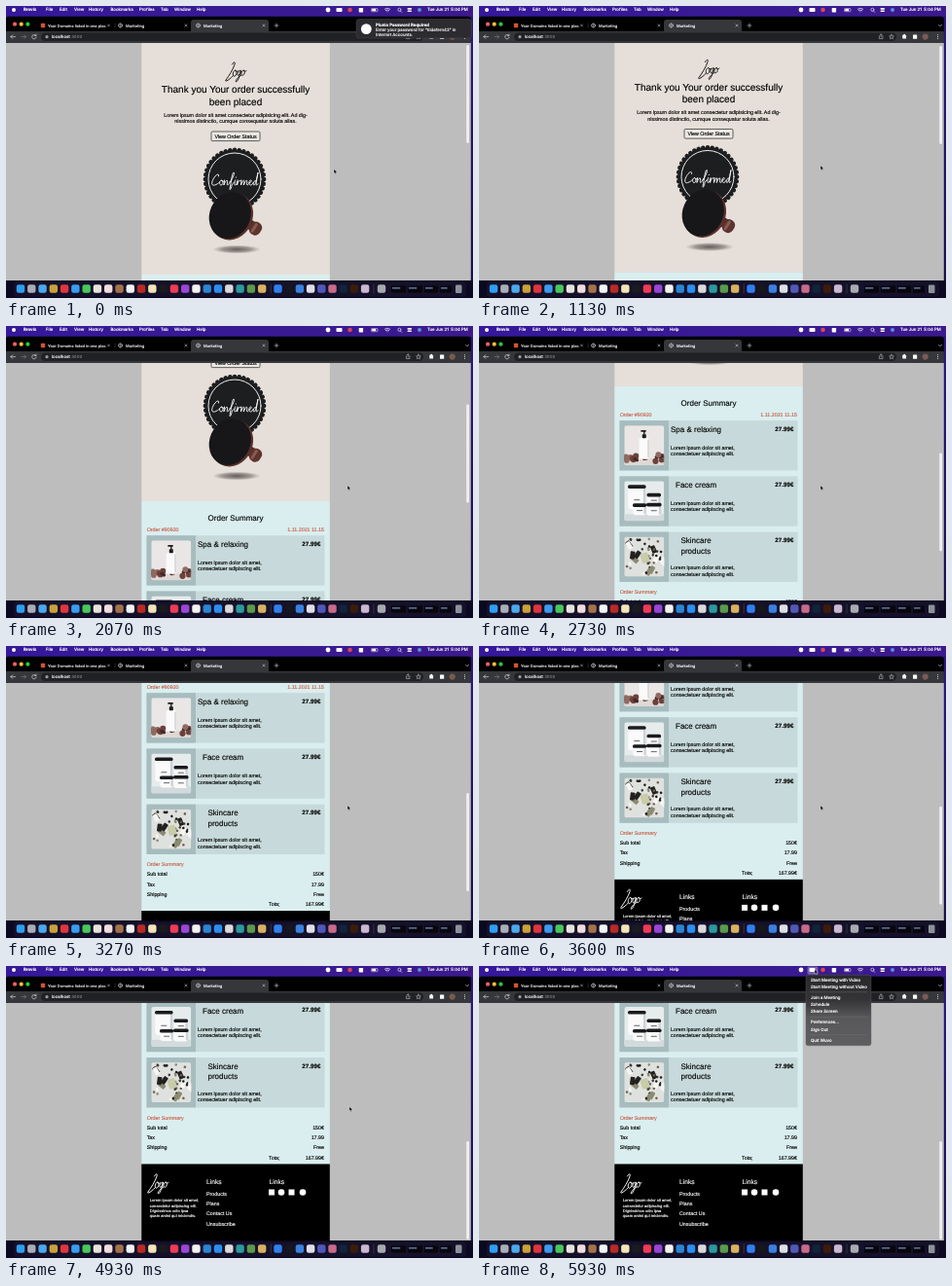
An HTML page for the animation above (5.99 s loop, 480x300 px).

```html
<!DOCTYPE html>
<html lang="en">
<head>
<meta charset="utf-8">
<title>Order confirmation</title>
<style>
html, body { margin: 0; height: 100%; overflow: hidden; background: #000; }
svg { display: block; width: 100vw; height: 100vh; }
text { text-rendering: geometricPrecision; white-space: pre; }
.ui { font-family: Inter, Roboto, sans-serif; font-weight: 500; }
.web { font-family: "Liberation Sans", Arial, sans-serif; }
.ink { fill: none; stroke-linecap: round; stroke-linejoin: round; }
</style>
</head>
<body>
<svg id="stage" viewBox="0 0 480 300" preserveAspectRatio="none"></svg>
<script>
const LOOP = 5990, STEP = 200 / 3, MAX_SCROLL = 331.5, VIEW_TOP = 38, VIEW_H = 244;

const rect = (x, y, w, h, fill, r = 0, more = '') =>
  `<rect x="${x}" y="${y}" width="${w}" height="${h}" rx="${r}" fill="${fill}" ${more}/>`;
const dot = (x, y, r, fill, more = '') => `<circle cx="${x}" cy="${y}" r="${r}" fill="${fill}" ${more}/>`;
const oval = (x, y, rx, ry, fill, more = '') =>
  `<ellipse cx="${x}" cy="${y}" rx="${rx}" ry="${ry}" fill="${fill}" ${more}/>`;
const line = (d, stroke, w, more = '') =>
  `<path class="ink" d="${d}" stroke="${stroke}" stroke-width="${w}" ${more}/>`;
// A hairline stroke gives small text the weight of screen rendering.
const text = (x, y, s, size, fill = '#000', more = '') =>
  `<text x="${x}" y="${y}" font-size="${size}" fill="${fill}" stroke="${fill}" stroke-width=".14" ${more}>${s.replace(/&/g, '&amp;')}</text>`;
const MID = 'text-anchor="middle"', END = 'text-anchor="end"', BOLD = 'font-weight="700"';
const BODY = 16 / 3, UI = 13 / 3;

function random(seed) {
  return () => (seed = (seed * 16807) % 2147483647) / 2147483647;
}

const LOGO = 'M7.5 3C9 0 11 0 10 3C8.5 8 4 15 1 19C0 21 2 20 4 18.6C6 17 7 16 8.5 14.5' +
  'M10.5 9C7.6 10 7.6 15.6 9.8 15.2C12.4 14.6 12.6 9 10.5 9C11.5 10.6 12.6 10.4 13.6 10' +
  'M16 9.3C13 8.6 12 14.4 13.8 14.4C15.2 14.2 16 11.5 16.4 9.3C15.4 14 14 19 12 20.8C10.4 21.6 11 17.6 17 14' +
  'M19 9C16.6 9.4 16.2 14.4 18.2 14.3C20.6 14 21 9 19 9C19.8 10.6 21 10.2 22 9.6';

const CONFIRMED = 'M8-9C9-12 6-12 3-7C0-2 1 1 4 0C6-.5 8-2 9-3' +
  'M11-5C8.5-5 8.5 0 10.5 0C13 0 13-5 11-5C12-3.5 13-3.5 14-4' +
  'M14-5L13.4 0C14.5-3 16-5.5 17-4.5C17.6-3.5 16 0 17.2 0C18 0 19-2 20-4' +
  'M20-3C23-8 25-13 23.5-13C22-13 21-4 19.5 4C19.5 6 21.5 3 21.5 0C22-1 23-2 24-3' +
  'M25-5C24.5-3 24 0 25 0C26 0 27-2 27.6-4M25.8-8l.2 0' +
  'M27.5-5L27 0C27.6-3 29-5.4 31-4.6' +
  'M31.5-5L31 0C32-3 33.5-5.6 34.3-4.5C34.6-3.5 33.8-1.5 33.8 0C34.8-3 36.4-5.6 37.2-4.5' +
  'C37.7-3.5 36.3 0 37.5 0C38.3 0 39-1.5 39.5-2.5' +
  'C42-3 42.5-5 41-5C39-5 38.8 0 41 0C42.2 0 43-1.5 43.5-2.5' +
  'M46.5-4.5C44.5-5.5 42.8-1 44.2 0C45.6.2 46.5-3 48.5-13C47.5-7 46 0 47 0C47.7 0 48-.6 48.5-1.3';

const logo = (x, y, color) => line(LOGO, color, 0.95, `transform="translate(${x} ${y})"`);

function stamp() {
  return dot(235, 178, 30.5, '#1d1e20') +
    `<circle class="ink" cx="235" cy="178" r="30.2" stroke="#1d1e20" stroke-width="4.4" pathLength="40" stroke-dasharray=".01 .99"/>` +
    `<circle class="ink" cx="235" cy="178" r="27" stroke="#eee" stroke-width="1"/>` +
    line(CONFIRMED, '#fff', 0.9, 'transform="translate(210.5 184)"') +
    oval(237, 250, 25, 4.5, 'url(#shade)') +
    `<g transform="rotate(32 250 224)">` +
    rect(243, 219, 16, 10, '#4a2a26', 3) + rect(252, 217.5, 12, 14, '#5d342e', 5.5) +
    rect(255, 219, 3, 11, '#8a5a50', 1.5) + `</g>` +
    oval(232, 216, 21.5, 25, '#5a302b', 'transform="rotate(24 232 216)"') +
    oval(230.3, 215, 21, 24.6, '#17171a', 'transform="rotate(24 230.3 215)"');
}

// Product pictures, drawn in a 41 by 41 box.
function bottlePhoto() {
  const rnd = random(11);
  let s = rect(0, 0, 41, 41, '#e9e6e5') + rect(0, 34, 41, 7, '#dfd8d5');
  for (let i = 0; i < 20; i++) {
    const x = 1 + rnd() * 39;
    s += dot(x, 30 + rnd() * 7, 1.8 + rnd() * 1.8, ['#6d4039', '#8f6a61', '#43292a'][i % 3]);
  }
  return s + rect(15.3, 12.5, 10.5, 22, '#fafafa', 2) + rect(23.8, 14, 2, 19, '#dadada', 1) +
    rect(18.5, 9, 4, 4, '#1c1c1c', 0.6) + rect(19.8, 5.5, 1.4, 4, '#1c1c1c') + rect(17, 4.8, 5.5, 1.7, '#1c1c1c', 0.6);
}

function jarPhoto() {
  const jar = (x, y, w, h) => rect(x, y + 1, w, h, '#fafafa', 2.4) +
    rect(x + w - 2.4, y + 3, 2.4, h - 3, '#cdd3d6', 1.2) + rect(x - 0.3, y, w + 0.6, 3.6, '#191b1d', 1.6) +
    rect(x + w / 2 - 3, y + h * 0.62, 6, 0.9, '#555');
  return rect(0, 0, 41, 41, '#e6ebec') + rect(0, 34, 41, 7, '#d3dadc') +
    jar(4, 4, 18, 24) + jar(23.5, 12.5, 14, 11) + jar(9, 23, 13.5, 11) + jar(23, 22.5, 15, 12);
}

function flatlayPhoto() {
  const rnd = random(77);
  const tones = ['#22211f', '#3d3b35', '#8c8b72', '#1a1a1a', '#f6f5f1', '#6d5f4c'];
  let s = rect(0, 0, 41, 41, '#dfe1de');
  for (let i = 0; i < 46; i++) {
    const x = 2 + rnd() * 36, y = 2 + rnd() * 36, big = i % 4 === 0;
    s += rect(x - 1, y - 1, big ? 4.8 : 2.4, big ? 8 : 2.4, tones[i % 6], 0.8,
      `transform="rotate(${rnd() * 120 - 60} ${x} ${y})"`);
  }
  return s + rect(17, 17, 8, 10, '#c9cca8', 1, 'transform="rotate(-18 20 21)"');
}

function card(y, x, title, descY, photo) {
  return rect(144.5, y, 183, 51.3, '#c7d9da') + rect(144.5, y, 50.5, 51.3, '#a7bcbe') +
    `<g clip-path="url(#round)" transform="translate(149.3 ${y + 5})">${photo}</g>` +
    title.map((s, i) => text(x, y + 11.7 + i * 10.4, s, 8)).join('') +
    text(323.4, y + 10.4, '27.99€', 6.24, '#000', `${END} ${BOLD}`) +
    text(197, y + descY, 'Lorem ipsum dolor sit amet,', BODY) +
    text(197, y + descY + 6.5, 'consectetuer adipiscing elit.', BODY);
}

function page() {
  const red = '#c65f49', white = '#fff';
  const rows = [['Sub total', '150€'], ['Tax', '17.99'], ['Shipping', 'Free'], ['Tota;', '167.99€']];
  const about = ['Lorem ipsum dolor sit amet,', 'consectetur adipiscing elit.', 'Dignissimos odio ipsa', 'quam animi qui reiciendis.'];
  return rect(139.3, 38, 193.5, 238, '#e6dfd9') + rect(139.3, 276, 193.5, 259, '#daeeef') + rect(139.3, 535, 193.5, 110, '#000') +
    logo(225, 57, '#111') +
    text(236, 89.3, 'Thank you Your order successfully', 10, '#000', MID) +
    text(236, 102, 'been placed', 10, '#000', MID) +
    text(236, 113.5, 'Lorem ipsum dolor sit amet consectetur adipisicing elit. Ad dig-', BODY, '#000', MID) +
    text(236, 120.3, 'nissimos distinctio, cumque consequatur soluta alias.', BODY, '#000', MID) +
    rect(211, 129, 50, 9.6, '#ece8e4', 1.2, 'stroke="#222" stroke-width=".7"') +
    text(236, 135.8, 'View Order Status', BODY, '#000', MID) +
    stamp() +
    text(236, 296, 'Order Summary', 8, '#000', MID) +
    text(144.7, 307, 'Order #90920', BODY, red) +
    text(327, 307, '1.11.2021 11.15', BODY, red, END) +
    card(311.2, 197, ['Spa & relaxing'], 29.6, bottlePhoto()) +
    card(368.4, 202, ['Face cream'], 29.6, jarPhoto()) +
    card(425.6, 207.5, ['Skincare', 'products'], 38.8, flatlayPhoto()) +
    text(144.7, 489, 'Order Summary', BODY, red) +
    rows.map(([a, b], i) => text(i === 3 ? 270 : 144.7, 499.2 + i * 10.3, a, BODY) +
      text(327, 499.2 + i * 10.3, b, BODY, '#000', END)).join('') +
    logo(145, 544.5, white) +
    about.map((s, i) => text(147.8, 573.8 + i * 5.2, s, 4.1, white)).join('') +
    text(206, 555.2, 'Links', 20 / 3, white) + text(270.5, 555.2, 'Links', 20 / 3, white) +
    ['Products', 'Plans', 'Contact Us', 'Unsubscribe'].map((s, i) => text(206, 567 + i * 10.35, s, BODY, white)).join('') +
    [273, 283, 293.5, 305].map((x, i) => i % 2 ? dot(x, 564, 3.3, white) : rect(x - 3, 561, 6, 6, white)).join('');
}

function menuBar() {
  const items = [[41, 'File'], [55, 'Edit'], [70, 'View'], [85, 'History'], [107.5, 'Bookmarks'],
    [137, 'Profiles'], [159, 'Tab'], [173, 'Window'], [196, 'Help']];
  const w = '#fff';
  return dot(8, 4, 2, w) +
    text(18, 5.4, 'Brovix', UI, w, BOLD) + items.map(([x, s]) => text(x, 5.4, s, UI, w)).join('') +
    dot(331, 4, 2.4, w) +
    rect(339.5, 2, 6, 4, w, 0.8) + dot(353.5, 4, 2.3, '#d8455a') + rect(362.7, 2, 4.4, 4.4, w, 0.6) +
    rect(375.5, 2.5, 6.5, 3.2, 'none', 0.8, 'stroke="#fff" stroke-width=".5"') + rect(376.2, 3.1, 4, 2, w) +
    line('M389.2 3.2Q392 1 394.8 3.2M390.3 4.6Q392 3.3 393.7 4.6M392 5.8l0 0', w, 0.7) +
    line('M405.3 5l1.4 1.4M406 3.8a1.6 1.6 0 1 1-3.2 0a1.6 1.6 0 1 1 3.2 0', w, 0.6) +
    rect(412.5, 2, 4.5, 1.7, w, 0.8) + rect(412.5, 4.4, 4.5, 1.7, w, 0.8) + dot(425, 4, 2, '#5f8ed8') +
    text(474.8, 5.4, 'Tue Jun 21  5:04 PM', UI, w, END);
}

function browser() {
  const g = '#d6d7da', globe = x => `<circle class="ink" cx="${x}" cy="20" r="2" stroke="${g}" stroke-width=".6"/>` +
    line(`M${x - 2} 20h4M${x} 18v4`, g, 0.4);
  const cross = x => line(`M${x - 1.1} 18.9l2.2 2.2m0-2.2l-2.2 2.2`, g, 0.5);
  return rect(0, 10.8, 477.8, 20, '#000', 3) +
    ['#f35f57', '#f5bd2f', '#28c840'].map((c, i) => dot(9 + i * 6.7, 18.7, 2.1, c)).join('') +
    rect(190, 14, 80, 14, '#36373b', 3) + rect(0, 26, 477.8, 12, '#36373b') +
    rect(36, 27.5, 393, 8.4, '#202124', 4.2) +
    rect(35.8, 17.8, 4.4, 4.4, '#d4532f', 0.8) +
    `<g clip-path="url(#tab)">${text(43, 21.5, 'Your Domains listed in one place', 4, '#ddd')}</g>` +
    globe(117.5) + text(123, 21.5, 'Marketing', 4, '#ddd') + globe(197.5) + text(203, 21.5, 'Marketing', 4, '#eee') +
    cross(105.5) + cross(185) + cross(265) + line('M276 20h4M278 18v4', g, 0.6) + line('M112 18v4', '#666', 0.4) +
    line('M472.5 19.3l1.6 1.6l1.6-1.6', g, 0.6) +
    line('M9.5 31.6h-4.6m1.8-1.8l-1.8 1.8l1.8 1.8', g, 0.7) +
    line('M16 31.6h4.6m-1.8-1.8l1.8 1.8l-1.8 1.8', '#77797d', 0.7) +
    line('M30.6 30.2a2.2 2.2 0 1 0 .5 2M31 29.2v1.4h-1.5', g, 0.7) +
    dot(42, 31.7, 1.6, '#9a9ca0') + text(47, 33.2, 'localhost<tspan fill="#8b8d91" stroke="none">:3000</tspan>', UI, '#eee') +
    line('M411.4 31v2.6h3.6v-2.6M413.2 32v-3m-1.2 1l1.2-1l1.2 1', g, 0.5) +
    line('M424 29.2l.7 1.6l1.7.2l-1.3 1.1l.4 1.7l-1.5-.9l-1.5.9l.4-1.7l-1.3-1.1l1.7-.2z', g, 0.5) +
    rect(435.3, 29.8, 3.8, 3.8, '#fff', 0.6) + dot(437.2, 29.6, 0.9, '#fff') + rect(446, 29.4, 4.2, 4.4, '#fff', 0.4) +
    dot(458.7, 31.6, 3.1, '#7a5a50') + [29.7, 31.6, 33.5].map(y => dot(471.5, y, 0.55, g)).join('');
}

function dock() {
  const tones = ['#2f9df0', '#a9adb5', '#4aa8ec', '#c9a13c', '#e0353f', '#3b9bf0', '#49c85a', '#e8e4dc', '#f0dedd',
    '#a5714a', '#f3f3f3', '#b92a24', '#f1e6b4', '#1a1b1f', '#ee3a55', '#9a45d6', '#f4f1f2', '#2a86d1', '#2b8ef0',
    '#d9d9d9', '#2b9a9c', '#5a9a4a', '#d9b25f'];
  const late = ['#2f7ff0', '#16171b', '#3a80e0', '#dedfe6', '#5058b8', '#c86a8a', '#10243a', '#3b1c08', '#c9b8d0'];
  const icon = (x, c) => rect(x - 4.2, 286.3, 8.4, 8.4, c, 2.2);
  const win = (x, w) => rect(x, 287.5, w, 7, '#07070b', 0.5) + rect(x + 1, 289, w * 0.55, 1.6, '#5b6f9c');
  return rect(0, 282, 480, 18, '#0d0822') + rect(8, 283.5, 465, 15.3, '#15112a', 3.5) +
    tones.map((c, i) => icon(15 + i * 11.28, c)).join('') + late.map((c, i) => icon(279.5 + i * 11.2, c)).join('') +
    line('M272.2 286v9M378 286v9', '#55565e', 0.5) + icon(386, '#a8abae') +
    win(396, 15) + win(413, 15) + win(430, 14) + win(446, 12) + rect(462, 286.5, 6.5, 8.5, '#8d9299', 1.2);
}

function notice() {
  return rect(360, 13.5, 118.5, 19.5, '#2c2b30', 3, 'stroke="#55545a" stroke-width=".4"') + dot(370.3, 23.6, 5.4, '#fff') +
    text(380, 21, 'Plunio Password Required', UI, '#fff', BOLD) +
    text(380, 26.2, 'Enter your password for “tildafern42” in', UI, '#eee') +
    text(380, 31.3, 'Internet Accounts.', UI, '#eee');
}

function dropMenu() {
  const items = [[14, 'Start Meeting with Video'], [21.3, 'Start Meeting without Video'], [32.2, 'Join a Meeting'],
    [39.5, 'Schedule'], [46.8, 'Share Screen'], [57.8, 'Preferences...'], [65.1, 'Sign Out'], [76.2, 'Quit Wuvo']];
  return rect(337.5, 0.5, 11, 8.2, '#fff', 1.5, 'opacity=".3"') +
    rect(336, 9.3, 67, 72.5, 'url(#panel)', 2.2, 'stroke="#5e5e63" stroke-width=".4"') +
    items.map(([y, s]) => text(341, y + 1.5, s, UI, '#fff')).join('') +
    line('M340 26.8h59M340 52.3h59M340 70.7h59', '#77777b', 0.4);
}

const stage = document.getElementById('stage');
stage.innerHTML = `<defs>
<clipPath id="view"><rect y="38" width="477.8" height="244"/></clipPath>
<clipPath id="round"><rect width="41" height="41" rx="2.5"/></clipPath>
<clipPath id="tab"><rect x="43" y="14" width="59.5" height="12"/></clipPath>
<linearGradient id="bar"><stop stop-color="#35189b"/><stop offset="1" stop-color="#3c1a8c"/></linearGradient>
<linearGradient id="desk" x2="0" y2="1"><stop stop-color="#2f1680"/><stop offset="1" stop-color="#1a0f45"/></linearGradient>
<linearGradient id="panel" x2="0" y2="1"><stop stop-color="#29292c"/><stop offset=".35" stop-color="#343437"/><stop offset=".6" stop-color="#58585a"/><stop offset="1" stop-color="#5e5e60"/></linearGradient>
<radialGradient id="shade"><stop stop-color="#544f4b" stop-opacity=".9"/><stop offset=".6" stop-color="#6d6762" stop-opacity=".6"/><stop offset="1" stop-color="#8a847e" stop-opacity="0"/></radialGradient>
</defs>
${rect(0, 0, 480, 300, 'url(#desk)')}${rect(0, 0, 480, 10.8, 'url(#bar)')}${rect(0, 38, 477.8, 244, '#bdbdbd')}
<g clip-path="url(#view)" class="web"><g id="page">${page()}</g></g>
${rect(473.2, 40, 2.8, 101, '#efefef', 1.4, 'id="thumb"')}
<g class="ui">${menuBar()}${browser()}${dock()}<g id="notice">${notice()}</g><g id="menu">${dropMenu()}</g></g>
<path id="cursor" d="M0 0v4.6l1.1-.9l.8 1.7l.8-.4l-.8-1.6h1.5z" fill="#000" stroke="#fff" stroke-width=".35"/>`;

const part = id => document.getElementById(id);
const pageEl = part('page'), thumb = part('thumb'), noticeEl = part('notice'), menuEl = part('menu'), cursor = part('cursor');

// Time and scroll offset, joined by a monotone cubic.
const SCROLL = [[1067, 0], [1533, 59], [2067, 96], [2733, 214], [3267, 263], [4200, 334], [4600, MAX_SCROLL]];
const slope = i => (SCROLL[i + 1][1] - SCROLL[i][1]) / (SCROLL[i + 1][0] - SCROLL[i][0]);
function tangent(i) {
  if (i === 0 || i === SCROLL.length - 1) return 0;
  const a = slope(i - 1), b = slope(i);
  return a * b <= 0 ? 0 : 2 * a * b / (a + b);
}
function scrollAt(t) {
  if (t <= SCROLL[0][0]) return 0;
  const i = SCROLL.findIndex(k => k[0] > t) - 1;
  if (i < 0) return MAX_SCROLL;
  const [t0, y0] = SCROLL[i], [t1, y1] = SCROLL[i + 1], h = t1 - t0, u = (t - t0) / h;
  return y0 + (y1 - y0) * u * u * (3 - 2 * u) +
    h * u * (1 - u) * ((1 - u) * tangent(i) - u * tangent(i + 1));
}

const ease = (t, a, b) => {
  const u = Math.min(1, Math.max(0, (t - a) / (b - a)));
  return u * u * (3 - 2 * u);
};

function cursorAt(t) {
  if (t < 599) return [337, 167.5];
  const up = ease(t, 4800, 5400), side = ease(t, 5400, 5667);
  return [351 + 15 * up - 21 * side, 163.8 - 153.8 * up - 6.5 * side];
}

function draw(time) {
  const t = Math.floor((time % LOOP + 4) / STEP) * STEP;
  const y = scrollAt(t);
  pageEl.setAttribute('transform', `translate(0 ${-y})`);
  thumb.setAttribute('y', VIEW_TOP + 2 + Math.min(y, MAX_SCROLL) / MAX_SCROLL * (VIEW_H - 104));
  noticeEl.style.display = t < 599 ? '' : 'none';
  menuEl.style.display = t > 5920 ? '' : 'none';
  cursor.setAttribute('transform', `translate(${cursorAt(t).join(' ')})`);
}

const start = performance.now();
function tick() {
  draw(performance.now() - start);
  requestAnimationFrame(tick);
}
tick();
</script>
</body>
</html>
```
